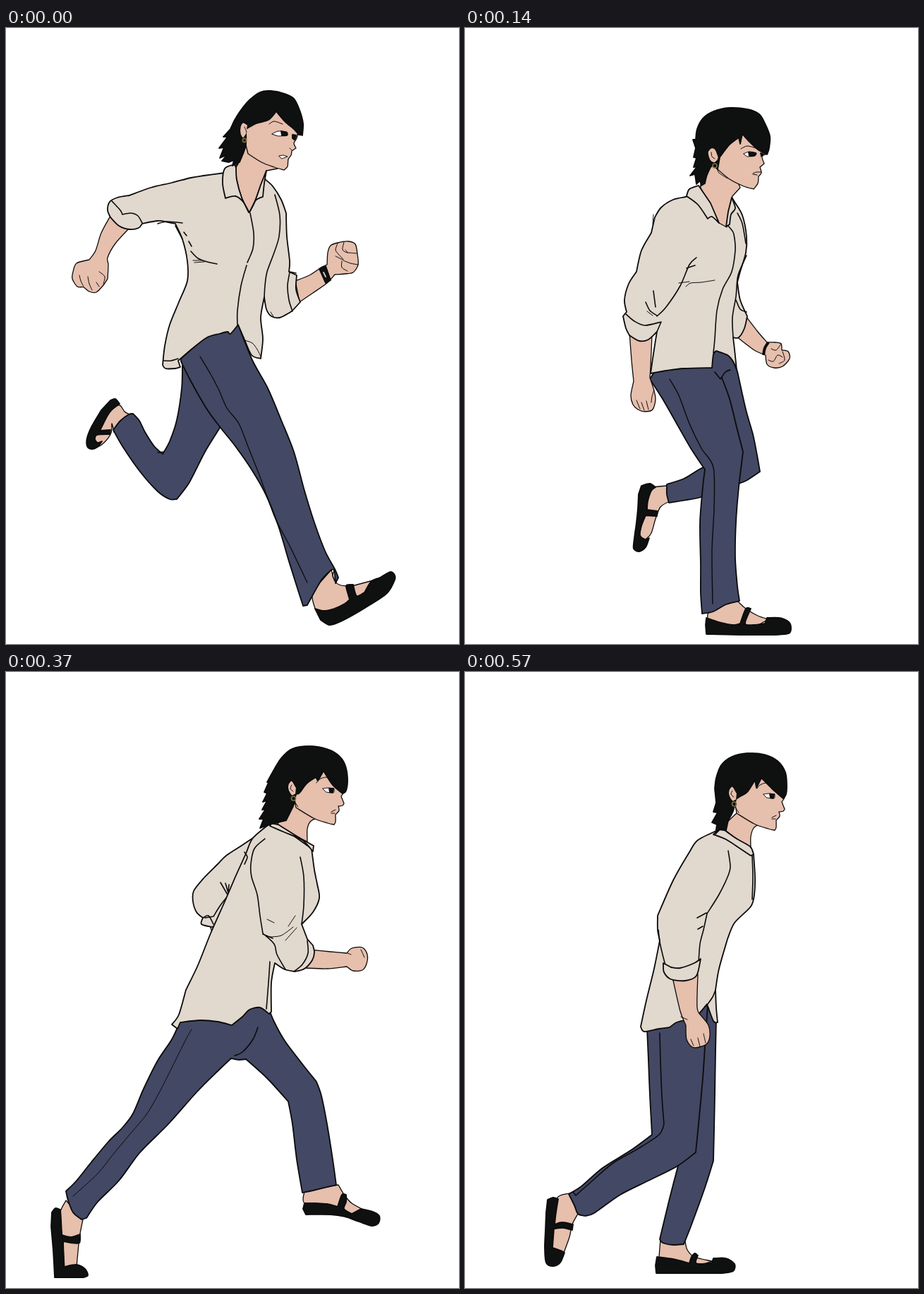
An HTML page that plays this animation: 642x872 px, repeating every 710 ms.

```html
<!DOCTYPE html>
<html lang="en">
<head>
<meta charset="utf-8">
<title>Run cycle</title>
<style>
html, body { margin: 0; width: 100%; height: 100%; overflow: hidden; background: #fff; }
svg { display: block; width: 100vw; height: 100vh; overflow: hidden; }
path, circle { stroke: #0b0b0b; stroke-width: 1.8; stroke-linejoin: round; stroke-linecap: round; }
.shirt { fill: #e1d8ce; }
.skin { fill: #e6bfad; stroke-width: 1.3; }
.jeans { fill: #434864; }
.ink { fill: #0f1111; }
.line { fill: none; stroke-width: 1.6; }
.fine { fill: none; stroke-width: 1; }
.eye { fill: #fff; stroke-width: 1; }
.band { fill: none; stroke-width: 4; stroke-linecap: butt; }
.ring { fill: none; stroke: #77743c; stroke-width: 1.6; }
.bare { stroke: none; }
/* poses stand side by side; the strip jumps one stage width at a time */
#strip { animation: run 710ms step-end infinite; }
@keyframes run {
  0% { transform: translateX(0); }
  19.718% { transform: translateX(-642px); }
  40.845% { transform: translateX(-1284px); }
  60.563% { transform: translateX(-1926px); }
  80.282%, 100% { transform: translateX(-2568px); }
}
</style>
</head>
<body>
<svg viewBox="0 0 642 872">
<defs>
  <g id="face">
    <path class="skin" d="M380 165L421 140L453 173L449 179L453 189L451 192 445 193L446 199 441 205L441 215 439 219L430 217 410 210 385 195Z"/>
  </g>
  <g id="features">
    <path class="skin" d="M385 166L379 157 374 162 374 170 379 178 384 176"/>
    <path class="fine" d="M379 163 377 168 381 172M382 184 384 188 388 194M414 160 418 155 428 152 440 157M435 201 441 198M435 203 440 203"/>
    <path class="eye" d="M423 168L431 167 439 168L438 174 428 173Z"/>
    <path class="ink" d="M432 168L438 168L437 173 433 173Z"/>
    <circle class="ring" cx="381.500" cy="182" r="3"/>
  </g>
</defs>
<g id="strip">

<g>
  <path class="skin" d="M150 540L161 534 168 543 175 547L153 572L150 560 149 573 140 586 130 592 122 580Z"/>
  <path class="ink" d="M148 527 155 525 161 532L154 537 146 545 138 560 133 570L148 569L147 575L129 576 126 582 130 587 136 585L130 593 121 596 115 592 115 580 122 563 135 541Z"/>
  <path class="jeans" d="M250 475L249 510 242 555 232 585 222 603L210 592 197 572 189 556 180 546L174 547 162 556 152 569L165 592 190 628 215 656 232 667 242 667L260 643 282 600 303 566L300 470Z"/>
  <path class="line" d="M215 601 224 600"/>
  <path class="skin" d="M461 767L466 783 475 789 490 790L520 782L500 810 450 827L438 822L434 803 445 785Z"/>
  <path class="ink" d="M438 822L450 825 465 822 480 815 487 809L482 791 485 788 492 788L497 804 508 799L518 783 530 778 544 770 550 773 551 781 540 800 515 817 490 832 470 842 458 845 446 838Z"/>
  <path class="jeans" d="M248 468L290 430L329 420L349 470 371 510 390 555 408 600 423 655 437 700 452 740 466 766 471 778L467 786L465 768 461 767L448 780 434 804 427 817L421 818L412 790 401 755 386 705 368 660 348 625 325 592 305 567 285 540 262 500 248 472Z"/>
  <path class="fine" d="M275 465 290 490 302 513 313 538 330 560 344 595 358 630 369 660 382 695 403 735 427 785M465 768 463 776 468 784" style="stroke-width:1.3"/>
  <path class="skin" d="M148 266L135 290 127 315 118 328L100 333 95 345 94 355 101 366 110 367 118 373 128 374 138 364 144 355L145 335 144 325 155 305 175 283Z"/>
  <path class="fine" d="M104 350 106 358 110 366M116 352 118 362 122 371M128 360 132 366M132 345 140 352 138 362"/>
  <path class="skin" d="M410 358L430 350 448 338L455 335L456 318 460 308 470 304 485 302 495 306 498 320 499 335 492 346 480 348 466 349L455 361 435 375 416 388Z"/>
  <path class="fine" d="M470 305 467 314 471 320 478 328 467 323M479 303 477 314 484 318 481 314M476 330 476 339 484 344M484 318 497 319M478 329 488 333 499 335"/>
  <path class="ink" d="M444 341L453 337L460 357L453 361Z"/>
  <path d="M450 346L453 352" style="stroke:#ccc"/>
  <path class="shirt" d="M310 205L280 209 262 212 235 219 205 226 175 237L158 240 147 246 144 258 148 268L160 280 175 285 188 283 193 277L215 273 230 275 240 277L250 299 257 330 257 358 245 388 232 420 225 450 222 477L226 482 240 482 247 480L244 471L265 453 285 438 302 433L314 430 318 433 329 420L338 441L348 463 361 468L364 440 361 410 366 381L369 398 376 408 388 410 400 404 406 400L417 388L411 370 412 350L401 345L402 330 398 295 397 262L390 243 378 224 367 214L356 200L330 192Z"/>
  <path class="line" d="M150 245 162 258 165 264L177 262 187 266 193 276M215 277 228 274 250 276M252 289 256 294M259 302 263 309M262 316 272 326 285 331 299 334M346 262 351 290 350 312 342 332M341 336 333 365 328 400 328 420M381 236 388 265 387 295 380 318 370 345 367 365 366 382M402 345 411 347M402 346 399 365 401 385 406 401M223 471 234 471 244 468M240 280 250 299"/>
  <path class="fine" d="M267 332 281 331M265 329 277 329M338 442 349 446 356 455 361 465M375 402 380 410"/>
  <path class="skin" d="M332 150L330 188 326 197L327 215 334 240 345 261L352 248 360 225 369 202L385 199Z"/>
  <path class="shirt" d="M324 193L310 199 307 220 311 241L325 238 336 246 344 261L334 240 327 215 326 198Z"/>
  <path class="shirt" d="M369 202L366 220 364 239L354 244 345 261L354 242 361 222Z"/>
  <path class="skin" d="M338 135L383 110L414 148L412 156 408 163 411 170L405 174L404 180 400 186 399 196 394 201L380 197 362 190 343 178L340 166Z"/>
  <path class="ink" d="M331 190L321 195L323 187L316 190L306 188L313 180L303 184L309 169L302 170L314 154L308 154L318 143L323 132L331 119 344 103 360 91 375 89 395 93 408 100 416 116 421 135 420 152L414 150L408 143 395 132 383 118L372 130 355 135 340 143L340 165 336 178Z"/>
  <path class="skin" d="M342 137L336 134 332 140 332 150 336 156 340 151"/>
  <path class="fine" d="M338 140 341 147M373 136 380 132 392 136M405 173 402 170M412 151 417 152"/>
  <path class="eye" d="M377 150L386 146 398 147L398 152 386 153Z"/>
  <path class="ink" d="M390 146 398 148 398 152 391 152Z"/>
  <path class="ink" d="M406 151 411 152 409 158 406 156Z"/>
  <path class="eye" d="M387 181L393 180L399 182L391 185Z"/>
  <circle class="ring" cx="338" cy="159" r="2.600"/>
</g>

<g transform="translate(642)">
  <path class="skin" d="M264 650L286 648L290 670L277 678 270 695 264 715 256 724L247 720L252 690Z"/>
  <path class="ink" d="M250 648 262 645 270 650L264 655 259 670 258 682L273 684L272 691L256 690L250 705 248 718 255 724 261 722L256 735 247 741 239 737 240 722 243 700 245 680 246 660Z"/>
  <path class="jeans" d="M345 470L356 457L372 463 380 472 386 486L398 540 408 575 414 605 418 628L400 640 388 645L340 663 289 672L286 660 286 646L310 638 330 626 350 615Z"/>
  <path class="skin" d="M344 829L358 820 386 811L398 822 415 832 430 837L400 850 343 843Z"/>
  <path class="ink" d="M342 835L360 841 380 845 390 843L398 822 405 822L397 843 409 845 425 843L428 835L445 835 458 840 462 848 459 857 440 859L390 859 342 858L341 845Z"/>
  <path class="jeans" d="M262 497L270 484L350 475L362 490L375 525 385 565 394 600L388 650 384 700 383 750 386 790 389 811L370 816 352 826 336 829L334 800 334 760 333 700 337 650 340 625L320 595 300 560 280 525 262 497Z"/>
  <path class="jeans bare" d="M340 478L356 458L372 464 384 484L369 490L361 497L345 495Z"/>
  <path class="line" d="M354 487 362 497L369 487 376 484"/>
  <path class="fine" d="M290 497 303 520 318 560 335 595 352 622 353 680 350 740 351 815" style="stroke-width:1.4"/>
  <path class="skin" d="M233 430L236 470 239 500L235 520 238 533 245 540 255 543 266 540 270 525 267 510 262 495L263 480 265 435Z"/>
  <path class="fine" d="M243 527 248 539M250 530 254 541M257 528 260 540M268 512 265 522 264 530"/>
  <path class="skin" d="M398 408L415 430 428 445L440 445 448 447 449 456L458 458 460 468 450 479 438 481 428 476 426 463L410 456 385 437Z"/>
  <path class="fine" d="M434 454 441 456 448 447M430 470 437 472 443 463 450 466M450 458 453 470 445 475"/>
  <path class="band" d="M423 463 425 453 430 445"/>
  <path class="shirt" d="M328 226L313 239L295 243 278 254 269 268L264 290L250 315 243 345L232 362 226 385 229 402L224 408L228 425 233 435L247 443 260 441 272 430L268 455 263 489L285 485 310 482 350 481L352 462 356 457L372 463 380 472 385 484L382 455 380 438L388 438 396 425 400 408L390 385 386 360L390 345 398 318 399 295 393 265 382 246L377 238L345 224Z"/>
  <path class="line" d="M328 325 318 335 305 365 285 395 272 408M267 372 270 395M256 388 262 400 272 407M314 340 326 336M227 404 240 415 255 421 278 416L272 430M382 297 383 315 378 345 365 370 357 400 354 440 352 460M399 322 387 350 384 380 379 410 380 438M372 279 380 289 382 298M384 385 390 398 399 402M386 262 393 277 398 305"/>
  <path class="fine" d="M313 366 320 361 335 360 354 357M303 361 318 359M258 401 266 407M267 264 266 278"/>
  <path class="skin" d="M338 215L334 226 348 250 360 276L371 282L374 260 379 238L390 226L375 195 345 185Z"/>
  <path class="shirt" d="M331 223L318 228 314 238L330 250 344 270L350 267 360 276L348 248Z"/>
  <path class="shirt" d="M378 240L383 255 377 264 375 278L370 281L373 260Z"/>
  <path class="skin" d="M350 175L390 145L428 178L421 182 424 192L418 197L420 205 416 210L415 220 409 228L395 224 375 214 358 200Z"/>
  <path class="ink" d="M335 223L333 216L328 221L326 207L319 209L329 196L324 197L328 184L324 183L327 170L323 158L327 158L329 143 337 128 352 118 375 113 400 115 417 122 425 135 432 153 431 170 428 179L415 172 402 160 393 150L390 164L388 155L375 165 361 183L358 200L350 195 343 208 340 220Z"/>
  <path class="skin" d="M359 182L355 172 349 170 344 176 347 187 353 191 357 188"/>
  <path class="fine" d="M349 176 350 182 354 185M391 171 400 167 412 170M419 182 424 179M358 200 360 205 372 213M408 206 413 204 420 204M408 207 414 208"/>
  <path class="eye" d="M395 178L403 175 413 177L411 181 400 182Z"/>
  <path class="ink" d="M402 176 412 177 409 181 403 181Z"/>
  <path class="ink" d="M419 177 423 179 420 181Z"/>
  <circle class="ring" cx="354" cy="195" r="3"/>
</g>

<g transform="translate(1284)">
  <path class="skin" d="M85 748L76 768 80 800 83 845L100 842L103 810 105 795 109 775Z"/>
  <path class="ink" d="M65 765 70 759 77 761L78 775 79 797L92 800 105 796L104 808 92 808 81 806L82 842L100 839 112 845 116 854 110 857L69 857L67 820 64 785Z"/>
  <path class="skin" d="M423 735L423 752 455 760 490 768L508 762L490 752 480 741 471 726Z"/>
  <path class="ink" d="M423 752L440 752 455 753 470 757L476 740 482 740L482 750 479 760 490 767L503 760L520 764 529 770 528 780 518 784 500 778 480 771 460 768 425 768L421 760Z"/>
  <path class="jeans" d="M247 494L235 520 215 550 195 590 180 625 165 645 145 665 120 695 100 720 85 735L88 748 95 765 107 775L114 773L130 750 160 720 190 680 230 640 270 595 300 565 319 547L330 549 340 548L370 575 400 608L406 640 412 690 420 737L435 734 468 726L463 690 455 640 447 600 440 580L420 555 395 522 380 495 370 470L300 470Z"/>
  <path class="line" d="M357 503 350 520 335 538 324 543"/>
  <path class="fine" d="M263 506 255 520 240 550 220 590 200 625 175 655 150 685 130 710 95 742"/>
  <path class="skin" d="M288 356L293 371L299 354Z"/>
  <path class="shirt" d="M350 235L335 245 312 260 300 272 280 292 266 310 265 325 270 340 279 348L277 357 292 361L305 355L340 270Z"/>
  <path class="line" d="M279 348 287 345 294 357M282 348 294 346L304 330 316 315M304 298 315 317M311 299 316 316M316 301 315 310"/>
  <path class="skin" d="M430 393L460 396 483 398L490 391 505 390 512 400 511 413 505 422 492 423 483 417L455 420 422 419Z"/>
  <path class="fine" d="M484 398 489 400M503 393 508 404"/>
  <path class="shirt" d="M376 213L350 235 340 257 325 290L310 325 290 370 272 415 255 450L245 485 235 499L243 505L247 496L275 493 300 495 320 500L335 488 345 478 360 475 373 484L376 481L376 440 381 412L395 421 410 424L423 420 434 408 437 397 435 387L427 378L419 357L435 340 444 320 441 300 437 280 433 250L405 230Z"/>
  <path class="line" d="M367 236 352 250 347 272 348 290 356 315 360 345 364 370L380 385 384 400 396 421M417 262 422 290 422 330 419 357M427 380 428 398 420 414 408 424M364 371 378 377M374 410 372 440 369 477M338 255 342 262 338 272"/>
  <path class="fine" d="M370 350 380 355M373 375 390 373 407 361M396 380 412 362M400 360 410 345"/>
  <path class="skin" d="M392 208L382 217L400 229 427 240L427 222 432 211 442 206L410 185Z"/>
  <path class="shirt" d="M376 214L374 218L395 227 420 238 435 254L436 246L415 234 386 216Z"/>
  <use href="#face" transform="translate(26 -3)"/>
  <path class="ink" d="M397 210L380 214L360 221L365 208L359 208L368 194L363 195L370 182L364 184L370 172L366 170L373 154L370 156L380 138 390 122 405 109 430 105 455 109 470 117 480 130 484 150 482 168 477 172L463 160 450 140L442 154L439 149L426 158 416 171 411 173L407 190Z"/>
  <use href="#features" transform="translate(26 -3)"/>
</g>

<g transform="translate(1926)">
  <path class="skin" d="M80 587L60 582 50 580L35 600L25 627L40 612 62 612Z"/>
  <path class="ink" d="M40 575 48 573 58 580L48 586 37 598 33 606L39 613L36 618L28 612L21 622 27 625L20 634 10 637 5 633 8 622 18 608 30 590Z"/>
  <path class="skin" d="M465 762L472 781L500 778 548 768L524 763 510 759 502 744Z"/>
  <path class="ink" d="M471 781L495 776 516 774L515 762L523 762L525 773 548 769L548 757L562 755 571 760 570 769 555 779 520 792 480 801Z"/>
  <path class="jeans" d="M240 482L238 505 225 545 200 595 182 622L150 617 110 602 80 586L70 590 62 608 60 620L90 632 130 651 165 665 190 672L205 667 225 640 260 600 290 560 308 537L325 538 334 545L360 585 395 635L410 670 430 710 458 764L475 762 506 743L480 690 463 645 449 612L425 575 395 545 370 510 355 475L347 453L300 460Z"/>
  <path class="line" d="M334 500 327 511 318 514L308 537M176 621 183 626M180 620 183 626"/>
  <path class="fine" d="M252 490 246 520 230 555 208 595 190 630 175 636 145 632 110 618 83 604"/>
  <path class="skin" d="M238 315L228 340 218 350L208 362 195 367 191 376 197 385 210 387 222 384 229 372 230 358L245 342 268 320Z"/>
  <path class="fine" d="M196 369 206 368 215 370M198 378 202 373 212 376 213 380M205 380 220 376 223 372"/>
  <path class="band" d="M218 350 224 354 231 356"/>
  <path class="shirt" d="M338 235L300 250 265 265 252 283 246 300L239 302 238 310 245 318 258 323 268 324L275 310L297 297L315 270Z"/>
  <path class="line" d="M245 301 255 307 275 309M285 290 290 299 298 297"/>
  <path class="skin" d="M440 358L480 356 505 354L510 346 525 346 534 355 534 370 528 377 515 378 508 375L480 382 452 389Z"/>
  <path class="fine" d="M505 354 512 356M524 348 530 357M530 363 533 367"/>
  <path class="shirt" d="M360 222L335 238 318 265 300 290L290 310 282 345 265 385L250 430 240 460 229 492L240 493L243 486L290 477 330 470 343 467L347 455 354 473L356 450 370 400 376 376L393 396 405 402 430 402 452 398L458 385 454 364 448 355 435 356L420 335 414 315L414 290 408 265 404 250L380 232Z"/>
  <path class="line" d="M344 245 338 260M337 272 342 300 355 325 365 345 376 376M388 261 400 285 412 315 424 347L438 358 444 377 442 392M330 330 345 350 368 364M433 354 440 352M376 376 382 374M373 380 360 420 350 457M230 486 239 488"/>
  <path class="fine" d="M423 370 440 361M372 247 378 253"/>
  <path class="skin" d="M372 212L365 222L380 234 402 247L402 228 405 216 414 211L390 190Z"/>
  <path class="shirt" d="M362 221L359 224L375 237 403 252L402 245L380 234 366 222Z"/>
  <use href="#face"/>
  <path class="ink" d="M365 222L356 217L347 223L354 209L347 209L355 197L346 198L352 189L343 183L351 178L344 178L352 158L347 158L360 135 373 121 390 113 407 110 425 112 442 119 453 133 457 150 456 165 451 172L440 162 428 148 421 142L414 160L412 152L400 165 390 176L384 174L380 195 372 210Z"/>
  <use href="#features"/>
</g>

<g transform="translate(2568)">
  <path class="skin" d="M277 803L275 828L320 842 350 834L325 828 315 818 312 806Z"/>
  <path class="ink" d="M272 828L295 831 318 837L321 828 326 823 330 826L327 836 335 838 350 836L352 830L370 830 382 838 380 848 365 851L271 851L270 840Z"/>
  <path class="jeans" d="M303 695L290 745 276 803L280 808 295 811 310 810L320 785 340 730 352 692L353 650 354 600 355 540 356 492L342 470L325 680Z"/>
  <path class="skin" d="M148 738L130 745 125 780 124 815L140 822L148 800 152 782 160 767Z"/>
  <path class="ink" d="M117 747 125 744 132 746L129 765 127 782L138 779 153 782L152 790L140 787 126 788L124 815L138 820 141 822L135 836 125 841 115 836 113 815 114 790 115 765Z"/>
  <path class="jeans" d="M258 505L260 550 262 600 265 655L235 677 195 702 165 728 147 739L155 755 160 767 170 770L183 766 220 740 260 720 300 700 327 680L331 640 337 575 340 530L344 472Z"/>
  <path class="line" d="M276 511 277 550 279 600 282 640L275 655 245 675 210 695 175 725 157 741L153 736"/>
  <path class="shirt" d="M358 224L330 238 318 255 295 295 273 345L273 365 276 380L268 420 257 465 249 502L254 509 275 505 290 503L300 496 315 492 330 485 343 470L352 494 358 496L356 475 355 450L360 420 372 378L382 355 405 332 410 315 411 290 409 258L400 245 380 235Z"/>
  <path class="line" d="M274 365 276 382 280 400 284 415M373 253 376 275 373 288 360 315 343 342L338 365 333 385 331 412M329 348 342 341M330 364 337 360M407 260 408 290 407 322M355 450 351 460 344 470"/>
  <path class="skin" d="M294 432L305 480 313 500L314 520 322 531 332 531 343 526 347 515 345 500 335 487L329 475 330 428Z"/>
  <path class="fine" d="M320 520 324 529M330 518 333 530M338 512 341 525M306 488 315 492"/>
  <path class="shirt" d="M281 412L282 425 292 435 312 437 328 430 334 406L325 412 305 419 292 418Z"/>
  <path class="skin" d="M372 212L369 224L385 236 405 249L405 233 409 221 416 216L390 195Z"/>
  <path class="shirt" d="M360 223L352 230L370 237 390 250 405 260L409 258L404 247 385 236 368 224Z"/>
  <use href="#face" transform="translate(0 5)"/>
  <path class="ink" d="M370 224L362 222L355 229L357 216L350 213L358 199L352 198L356 185L354 165L356 150 363 132 378 120 400 115 425 117 443 126 454 142 456 160 455 173 451 179L435 165 420 150L413 164L411 153L400 170 390 176 384 180L380 197 373 210Z"/>
  <use href="#features" transform="translate(0 5)"/>
</g>

</g>
</svg>
<script>
// Each M or L run becomes one smooth curve; corners stay where runs meet.
const smooth = d => {
  let last;
  return d.replace(/([ML])([^MLZ]*)/g, (_, cmd, text) => {
    const n = text.trim().split(/\s+/).map(Number), p = [];
    if (cmd === 'L') p.push(last);
    for (let i = 0; i < n.length; i += 2) p.push([n[i], n[i + 1]]);
    last = p[p.length - 1];
    let out = cmd === 'M' ? 'M' + p[0] : '';
    for (let i = 0; i + 1 < p.length; i++) {
      const b = p[i], c = p[i + 1], a = p[i - 1] || b, e = p[i + 2] || c;
      const h1 = b.map((v, k) => v + (c[k] - a[k]) * 0.15);
      const h2 = c.map((v, k) => v - (e[k] - b[k]) * 0.15);
      out += `C${h1} ${h2} ${c}`;
    }
    return out;
  });
};
for (const path of document.querySelectorAll('path')) path.setAttribute('d', smooth(path.getAttribute('d')));
</script>
</body>
</html>
```
